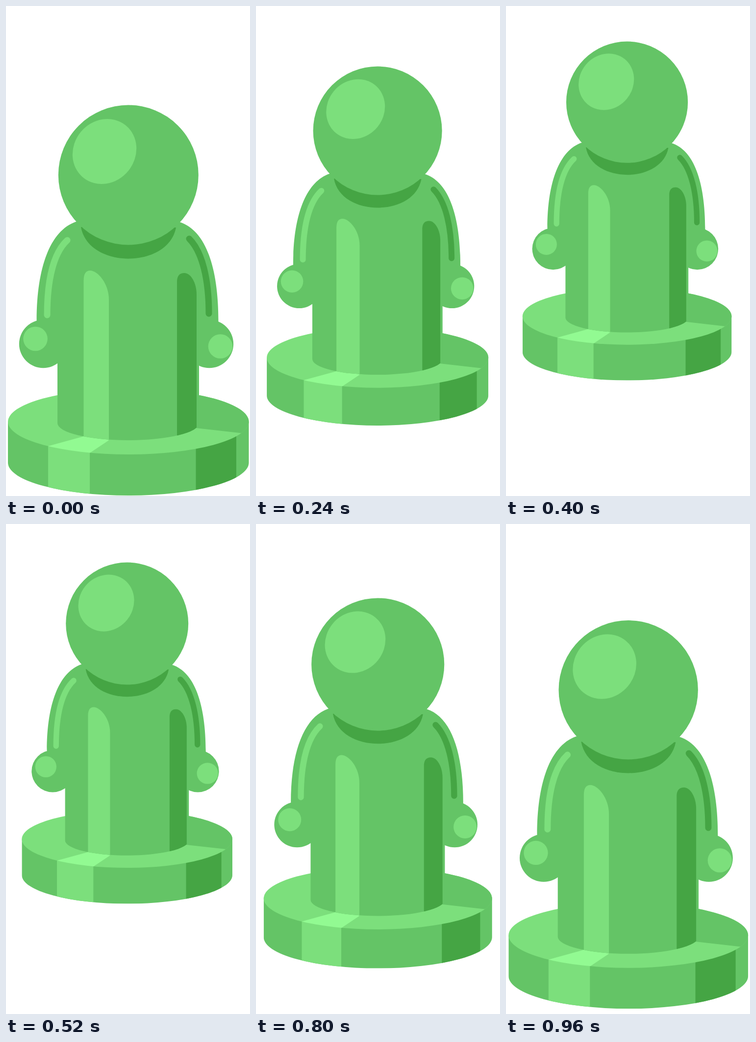
These frames come from a looping animation (498 px wide and 1002 px high, 1 s). An HTML page:

```html
<!DOCTYPE html>
<html lang="en">
<head>
<meta charset="utf-8">
<title>Hopping game piece</title>
<style>
  html, body { margin: 0; width: 100%; height: 100%; overflow: hidden; background: #fff; }
  svg { display: block; width: 498px; height: 1002px; }
  .mid { fill: #64c466; }
  .light { fill: #7cdf7c; }
  .dark { fill: #45a544; }
  .bright { fill: #92fa92; }
  .streak { fill: none; stroke-width: 13; stroke-linecap: round; }
</style>
</head>
<body>
<svg viewBox="0 0 498 1002">
  <defs>
    <clipPath id="side"><path d="M4 850V934A245.8 67 0 0 0 495.6 934V850Z"/></clipPath>
    <clipPath id="top"><ellipse cx="249.8" cy="850" rx="245.8" ry="67"/></clipPath>
    <clipPath id="trunk"><path d="M105 500V853A144.5 35 0 0 0 394 853V500Z"/></clipPath>
  </defs>
  <g id="piece">
    <!-- base -->
    <g clip-path="url(#side)">
      <path class="mid" d="M0 840H498V1002H0Z"/>
      <path class="light" d="M86 840H171V1002H86Z"/>
      <path class="dark" d="M387.5 840H470V1002H387.5Z"/>
    </g>
    <g clip-path="url(#top)">
      <path class="light" d="M0 780H498V920H0Z"/>
      <path class="mid" d="M250 848L388 863L481 873.5H498V780H250Z"/>
      <path class="bright" d="M86 900L155 881L180 870L210 888L171 914L120 920Z"/>
    </g>

    <!-- body and hands -->
    <path class="mid" d="M143 441C91 459 62.5 533 62.5 643L105 731V853A144.5 35 0 0 0 394 853V735L433.5 645C433.5 533 407 459 355 442Z"/>
    <circle class="mid" cx="76" cy="691" r="49.2"/>
    <circle class="mid" cx="415" cy="691" r="49.2"/>
    <circle class="light" cx="60" cy="680.5" r="24.8"/>
    <circle class="light" cx="437.5" cy="696" r="24.8"/>

    <!-- streaks on trunk and arms -->
    <g clip-path="url(#trunk)">
      <path class="light" d="M158.5 900V561Q158.5 541 172 541C186 541 210 566 210 601V900Z"/>
      <path class="dark" d="M349 900V562Q350 546 364 546C377 546 389 566 389 590V900Z"/>
    </g>
    <path class="streak" stroke="#7cdf7c" d="M84 632C84 560 97 505 125 479"/>
    <path class="streak" stroke="#45a544" d="M374 476C401 503 414 560 414 629"/>

    <!-- head -->
    <path class="dark" d="M153 452C168 538 331 538 347 453Z"/>
    <circle class="mid" cx="249.8" cy="345.5" r="143"/>
    <ellipse class="light" rx="68.8" ry="62.7" transform="translate(201 297.5) rotate(-51)"/>
  </g>
</svg>
<script>
  const LOOP = 1000, STEP = 40;
  const VANISH_X = 229, VANISH_Y = -782;

  // [time in ms, scale about the vanishing point]
  const keys = [
    [0, 1], [240, .9198], [400, .868], [440, .852], [520, .8741],
    [680, .9157], [800, .9482], [960, .9945], [1000, 1]
  ];
  const piece = document.getElementById('piece');

  function scaleAt(time) {
    const next = keys.findIndex(([t]) => t > time);
    const [t0, s0] = keys[next - 1], [t1, s1] = keys[next];
    return s0 + (s1 - s0) * (time - t0) / (t1 - t0);
  }

  function draw() {
    const time = Math.floor(performance.now() % LOOP / STEP) * STEP;
    const s = scaleAt(time);
    piece.setAttribute('transform',
      `translate(${VANISH_X * (1 - s)} ${VANISH_Y * (1 - s)}) scale(${s})`);
    requestAnimationFrame(draw);
  }
  draw();
</script>
</body>
</html>
```
